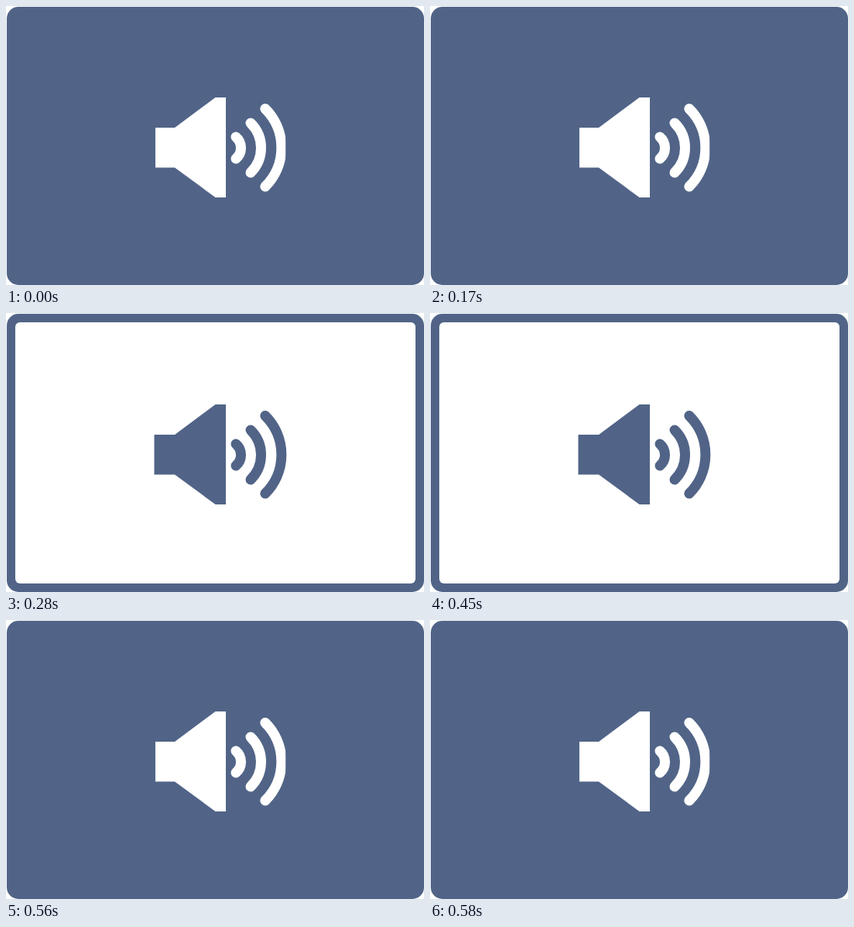
Write an HTML page that moves like this. It is 540 px wide and 360 px high and loops after 600 ms.

```html
<!DOCTYPE html>
<html lang="en">
<head>
<meta charset="utf-8">
<title>Blinking speaker</title>
<style>
  html, body { margin: 0; width: 100%; height: 100%; overflow: hidden; background: #fff; }
  svg { display: block; width: 540px; height: 360px; }
  #waves { fill: none; stroke: currentColor; stroke-width: 13; stroke-linecap: round; }
</style>
</head>
<body>
<svg viewBox="0 0 540 360">
  <clipPath id="trim"><rect x="193" y="110" width="168.2" height="150"/></clipPath>
  <rect x="1" y="1" width="539" height="359" rx="15" fill="#516487"/>
  <rect id="panel" x="12" y="12" width="517" height="337" rx="6" fill="#fff"/>
  <g id="icon" color="#fff">
    <path fill="currentColor" d="M191.5 157H218L270.5 118H284V247H270.5L218 208.5H191.5Z"/>
    <g id="waves">
      <path d="M297 169A18.3 18.3 0 0 1 297 197"/>
      <path d="M316 151A44.7 44.7 0 0 1 316 215"/>
      <path d="M334.8 132.5A70.5 70.5 0 0 1 334.8 233"/>
    </g>
  </g>
</svg>
<script>
  const panel = document.getElementById('panel');
  const icon = document.getElementById('icon');
  const start = performance.now();

  function draw(now) {
    const t = Math.max(0, now - start) % 600;
    const light = t >= 280 && t < 560;
    panel.setAttribute('visibility', light ? 'visible' : 'hidden');
    icon.setAttribute('color', light ? '#516487' : '#fff');
    // The white icon is slightly cropped at both sides.
    icon.setAttribute('clip-path', light ? 'none' : 'url(#trim)');
    requestAnimationFrame(draw);
  }
  draw(start);
</script>
</body>
</html>
```
